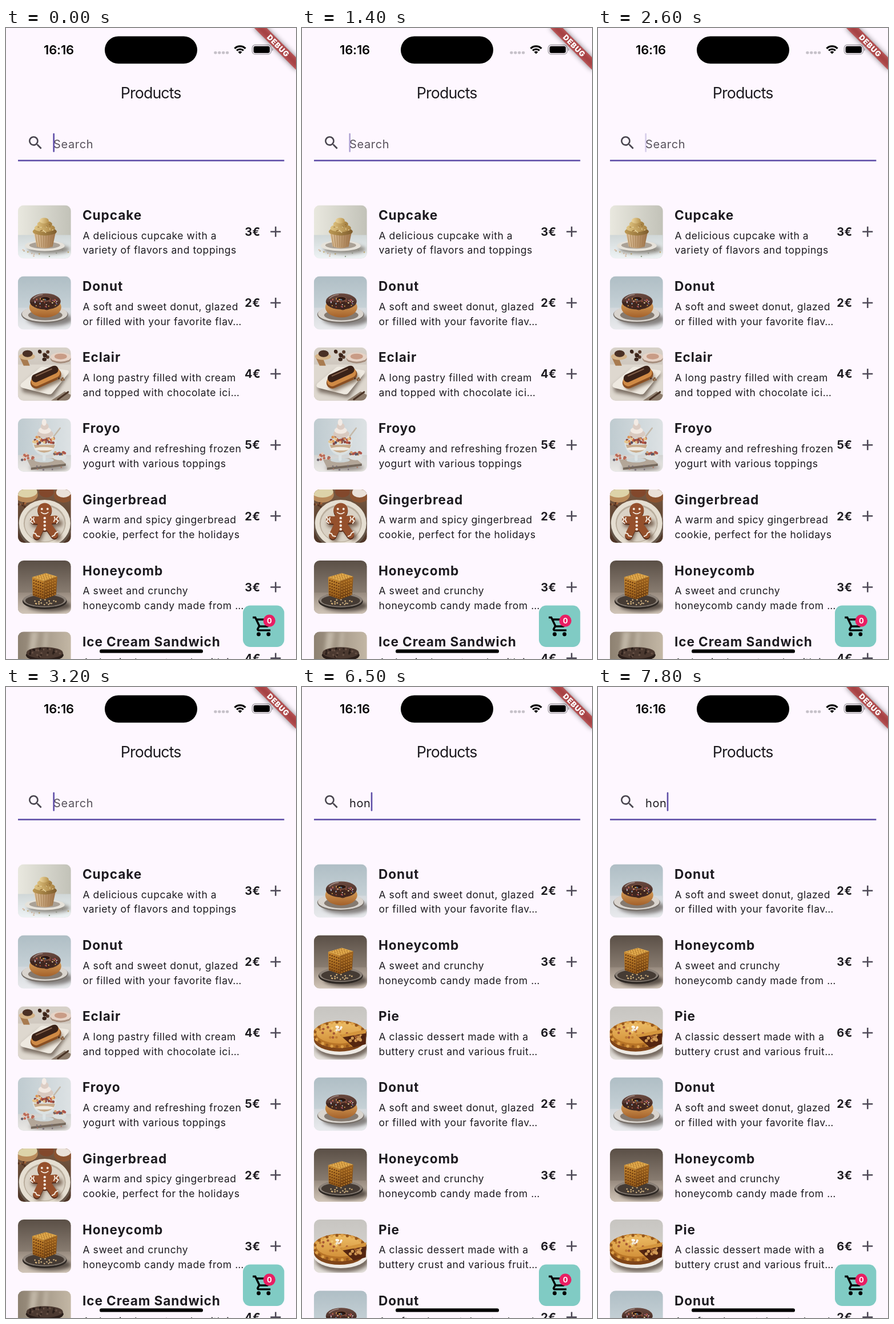
Write an HTML page that moves like this. It is 508 px wide and 1102 px high and loops after 8 s.

```html
<!DOCTYPE html>
<html lang="en">
<head>
<meta charset="utf-8">
<title>Products</title>
<style>
  html, body { margin: 0; width: 100%; height: 100%; overflow: hidden; background: #fef7ff; }
  svg { display: block; width: 100vw; height: 100vh; }
  text { font-family: Inter, Roboto, sans-serif; font-optical-sizing: none; fill: #1d1b20; white-space: pre; }
  .name { font-size: 22.6px; font-weight: 650; letter-spacing: .9px; }
  .desc { font-size: 17.5px; letter-spacing: .55px; }
  .price { font-size: 20px; font-weight: 700; letter-spacing: .5px; text-anchor: middle; }
  .field { font-size: 20px; letter-spacing: .65px; }
  .plus { stroke: #4f4a58; stroke-width: 2.6; }
  .soft { filter: blur(3px); }
</style>
</head>
<body>
<svg viewBox="0 0 508 1102" id="stage">
  <defs id="defs">
    <clipPath id="thumb"><rect width="93" height="93" rx="10.3"/></clipPath>
  </defs>
  <rect width="508" height="1102" fill="#fef7ff"/>

  <text x="92.5" y="46" font-size="22" font-weight="600" letter-spacing="-.2" text-anchor="middle" style="fill:#000">16:16</text>
  <rect x="173" y="14.5" width="162" height="47.7" rx="23.8"/>
  <g fill="#c6c1c9" id="signal"></g>
  <g transform="translate(410 45.3)" fill="none" stroke="#000" stroke-width="3.2">
    <path d="M-9.5-9.5A13.4 13.4 0 0 1 9.5-9.5M-5.9-5.9A8.4 8.4 0 0 1 5.9-5.9"/>
    <path d="M0 0L-3.4-3.4A4.8 4.8 0 0 1 3.4-3.4Z" fill="#000" stroke="none"/>
  </g>
  <rect x="431.3" y="29.5" width="33" height="16.4" rx="5.2" fill="none" stroke="#a19ca3" stroke-width="1.3"/>
  <rect x="433.6" y="31.7" width="28.4" height="12" rx="3.2"/>
  <path d="M466 35v5.4a3 3 0 0 0 0-5.4" fill="#a19ca3"/>

  <text x="253.7" y="122.5" font-size="26.8" letter-spacing="-.9" text-anchor="middle">Products</text>

  <path transform="translate(36.1 185) scale(1.293)" fill="#49454f" d="M15.5 14h-.79l-.28-.27A6.47 6.47 0 0 0 16 9.5 6.5 6.5 0 1 0 9.5 16c1.61 0 3.09-.59 4.23-1.57l.27.28v.79l5 4.99L20.49 19zm-6 0a4.5 4.5 0 1 1 0-9 4.5 4.5 0 0 1 0 9z"/>
  <text class="field" id="hint" x="83" y="209.8" style="fill:#57525b">Search</text>
  <text class="field" id="query" x="83" y="209.8"></text>
  <rect id="caret" y="183.8" width="2.6" height="33" rx="1.2" fill="#5f4fa8"/>
  <rect x="21" y="230.2" width="466.4" height="2.6" fill="#5f4fa8"/>

  <g id="lists"></g>

  <rect x="415" y="1008.6" width="72.4" height="72.4" rx="12.9" fill="#80cbc4"/>
  <path transform="translate(430.5 1024.3) scale(1.724)" d="M15.55 13c.75 0 1.41-.41 1.75-1.03l3.58-6.49A1 1 0 0 0 20.01 4H5.21l-.94-2H1v2h2l3.6 7.59-1.35 2.44C4.52 15.37 5.48 17 7 17h12v-2H7l1.1-2zM6.16 6h12.15l-2.76 5H8.53zM7 18a2 2 0 1 0 0 4 2 2 0 0 0 0-4zm10 0a2 2 0 1 0 0 4 2 2 0 0 0 0-4z"/>
  <circle cx="461.3" cy="1035.2" r="10.6" fill="#e91e63"/>
  <text x="461.3" y="1039.9" font-size="13" font-weight="700" text-anchor="middle" style="fill:#fff">0</text>
  <rect x="164" y="1085.2" width="181" height="6.4" rx="3.2"/>

  <g transform="translate(508 0) rotate(45)">
    <rect x="-52" y="36.2" width="104" height="15.5" fill="#000" opacity=".5" style="filter:blur(5px)"/>
    <rect x="-52" y="36.2" width="104" height="15.5" fill="#b71c1c" fill-opacity=".627"/>
    <text y="48.7" font-size="13" font-weight="900" letter-spacing=".8" text-anchor="middle" style="fill:#fff">DEBUG</text>
  </g>
</svg>

<script>
const $ = id => document.getElementById(id);
const LOOP = 8000;

// Drawing helpers; thumbnails use a 93 x 93 box.
const oval = (x, y, rx, ry, fill) => `<ellipse cx="${x}" cy="${y}" rx="${rx}" ry="${ry}" fill="${fill}"/>`;
const dot = (x, y, r, fill) => oval(x, y, r, r, fill);
const soft = shapes => `<g class="soft">${shapes}</g>`;
const shape = (d, fill) => `<path d="${d}" fill="${fill}"/>`;
const line = (d, stroke, width) =>
  `<path d="${d}" fill="none" stroke="${stroke}" stroke-width="${width}" stroke-linecap="round" stroke-linejoin="round"/>`;
const repeat = (n, draw) => Array.from({ length: n }, (_, i) => draw(i)).join('');
let gradients = 0;
function shade(from, to, sideways) {
  const id = 'shade' + gradients++;
  $('defs').insertAdjacentHTML('beforeend',
    `<linearGradient id="${id}" x2="${sideways ? 1 : 0}" y2="${sideways ? 0 : 1}"><stop stop-color="${from}"/><stop offset="1" stop-color="${to}"/></linearGradient>`);
  return `url(#${id})`;
}
const wall = (from, to, sideways) => shape('M0 0H93V93H0Z', shade(from, to, sideways));
let seed = 7;
const random = () => (seed = seed * 16807 % 2147483647) / 2147483647;
const pick = list => list[Math.floor(random() * list.length)];

// Random dots spread inside an oval.
const scatter = (n, x, y, rx, ry, r, colors) => repeat(n, () => {
  const a = random() * 2 * Math.PI, d = Math.sqrt(random());
  return dot((x + rx * d * Math.cos(a)).toFixed(1), (y + ry * d * Math.sin(a)).toFixed(1), r, pick(colors));
});

const art = {
  cupcake: () => wall('#e9e8df', '#c2c2b8', true) +
    shape('M0 52H93V93H0Z', shade('#d0d7d7', '#eef3f5')) +
    scatter(16, 46, 82, 44, 9, 1.2, ['#c8a85c', '#8fa08a', '#d8b9a0']) +
    soft(oval(54, 77, 37, 8, '#8f8b83')) + oval(47, 71, 35, 9, '#e6e2da') + oval(47, 70, 27, 6, '#aaa196') +
    shape('M28 48H66L61 72Q47 78 33 72Z', shade('#e2c69e', '#9c7148', true)) +
    repeat(8, i => line(`M${31 + i * 4.6} 51L${34.5 + i * 3.6} 73`, '#a37a4c', .8)) +
    oval(47, 46, 21, 7, shade('#bd9a55', '#7f5d2d', true)) + oval(47, 40, 18, 7, shade('#e0c584', '#a98342', true)) +
    oval(47, 33, 13, 6, shade('#dcbf7c', '#a17b3c', true)) + oval(46, 27, 8, 5, shade('#ecd6a0', '#b9954f', true)) +
    scatter(14, 47, 39, 16, 9, .9, ['#f2e2b4', '#906b30']),

  donut: () => wall('#afbec5', '#d6dee2') + shape('M0 55H93V93H0Z', shade('#d3d8dc', '#e9eaed')) +
    soft(oval(56, 75, 40, 12, '#85817f')) + oval(47, 67, 41, 15, '#77706a') + oval(47, 65.5, 40, 14, '#d9d4ce') +
    oval(48, 68, 30, 9, '#857a70') + oval(48, 54, 28, 18, shade('#e9b468', '#a3602a')) +
    oval(48, 44, 27, 14, shade('#6b4a40', '#3b231d')) + shape('M21 45Q24 55 32 52T45 56T60 54T75 45Z', '#40261f') +
    oval(48, 40, 10, 4.5, '#7c5140') + oval(48, 39.5, 8, 3.2, '#2a1712') +
    line('M27 39Q33 33 43 32', '#a08881', 1.6) +
    scatter(34, 48, 46, 24, 8, 1, ['#e6b04f', '#d5769a', '#eee3d4', '#6a8fb5', '#c3563e']),

  eclair: () => wall('#d8d2ca', '#bcb2a7') + shape('M0 30H93V93H0Z', '#ded8cf') +
    shape('M15 17L21 32H10L3 17Z', '#a87b50') + oval(16, 16, 14, 6, '#d5b489') + oval(17, 11, 9, 6, '#4a3024') +
    oval(75, 20, 18, 8, '#a58d7c') + oval(75, 17, 18, 8, '#e6d3c6') + oval(75, 16, 11, 5, '#c99c86') +
    scatter(9, 45, 13, 9, 10, 3, ['#392319', '#57392a']) +
    soft(shape('M6 68L38 41L90 46L61 88L9 78Z', '#7d7166')) +
    shape('M6 63L38 36Q41 33 46 34L87 40Q91 41 88 46L61 79Q58 83 53 82L9 71Q2 69 6 63Z', '#eee9e0') +
    soft(line('M36 68L70 53', '#8b7966', 16)) + line('M32 62L66 47', '#8a4f22', 20) + line('M32 59L65 44', '#cf8a45', 18) +
    line('M31 54L64 39', '#3a2218', 14) + line('M32 50L59 38', '#84614b', 2) +
    shape('M58 93L82 77L93 83V93Z', '#8d7c6c') +
    line('M70 91L88 78', '#4a3325', 3) + scatter(7, 76, 52, 8, 6, 1.6, ['#4a2e20', '#86603f']),

  froyo: () => wall('#bfcbd0', '#dde2e4', true) + shape('M0 64H93V93H0Z', shade('#d2d3d2', '#ebe9e6')) +
    soft(oval(54, 86, 34, 5, '#918a84')) +
    shape('M16 72L72 69L84 79L23 86Z', '#b3a698') + shape('M23 86L84 79V83L23 90Z', '#75685c') +
    line('M61 34L74 17', '#c4b9a9', 2.5) + oval(46, 73, 17, 4, '#ced6d8') + line('M46 59V72', '#dce4e6', 5) +
    shape('M25 38H68Q67 62 46 65Q26 62 25 38Z', '#dce2e2') +
    shape('M28 46H65Q63 58 46 60Q31 58 28 46Z', '#c9ac8c') + oval(46, 53, 17, 3, '#f0ebe2') +
    scatter(40, 46, 38, 21, 8, 2.4, ['#b9543f', '#dc9254', '#5a5060', '#e4c48c', '#8d4a44', '#ecdccb']) +
    oval(48, 27, 14, 7, '#d9c9bf') + oval(47, 21, 11, 6, '#f2e9e2') + oval(47, 14, 7, 6, '#dccdc4') + oval(46, 7, 4, 6, '#f3ebe5') +
    oval(73, 67, 12, 6, '#dce0df') + scatter(15, 73, 62, 10, 4, 2.2, ['#b0564a', '#5d5665', '#d39c6a']) +
    scatter(12, 16, 68, 11, 8, 2.2, ['#bd6a56', '#e3c9b8', '#6a6169']) + scatter(8, 45, 86, 38, 4, 1.3, ['#a97a69', '#7b7079']),

  gingerbread: () => wall('#795b43', '#4d3426') +
    oval(15, 9, 20, 14, '#b98b5b') + oval(15, 4, 19, 10, '#ddd3a9') +
    oval(50, 4, 13, 10, '#82482c') + oval(80, 10, 17, 13, '#8b5330') + oval(80, 5, 13, 9, '#eae1d8') +
    oval(47, 62, 47, 43, '#66574a') + oval(47, 59, 45, 41, '#e5ded1') + oval(47, 59, 37, 33, '#b9ad9c') + oval(47, 60, 35, 31, '#dad2c5') +
    soft(line('M29 60L72 59M43 66L36 85M55 66L70 83', '#7b6554', 12)) +
    ['#552a19', '#95502c'].map((c, i) => `<g transform="translate(0 ${1 - i * 2})">` +
      line('M28 54L45 55L66 53M41 64L33 81M53 64L64 80', c, 13) + oval(47, 57, 13, 16, c) + dot(47, 37, 12.5, c) + '</g>').join('') +
    line('M22 48l3 4l-3 4l4 3M28 49l-1 4l2 4M70 48l-3 4l4 3l-3 4M64 48l1 4l-2 4M27 76l4 1l2 4l5 1M70 74l-4 2l-2 4l-4 2', '#f3e9de', 2) +
    dot(42, 34, 2, '#f3e9de') + dot(52, 34, 2, '#f3e9de') + line('M41 40Q47 45 53 40', '#f3e9de', 1.8) +
    repeat(4, i => dot(47, 50 + i * 6.5, 2.2, '#f6eee6')) + scatter(8, 8, 27, 8, 4, 2, ['#a4653b', '#51301f']),

  honeycomb: () => wall('#5a4f46', '#a79a8d') + shape('M0 56H93V93H0Z', shade('#978a7e', '#d2c6b9')) +
    soft(oval(56, 79, 38, 10, '#5a5048')) + oval(47, 71, 39, 14, '#2f2925') + oval(47, 69, 38, 12.5, '#8b8178') + oval(47, 70, 34, 10, '#453b34') +
    shape('M25 29L49 22L69 28L46 36Z', '#dfa84b') +
    shape('M25 29L46 36V68L26 61Z', shade('#c98a30', '#8f5516')) + shape('M46 36L69 28L67 60L46 68Z', shade('#a3671f', '#6b3c10')) +
    repeat(30, i => dot(28 + i % 5 * 3.9, 34.5 + i % 5 * 1.35 + Math.floor(i / 5) * 5, 1.3, '#6b3a11')) +
    repeat(30, i => dot(49 + i % 5 * 4, 39.5 - i % 5 * 1.4 + Math.floor(i / 5) * 5, 1.1, '#c48632')) +
    repeat(20, i => dot(32 + i % 5 * 4 + Math.floor(i / 5) * 5, 28.5 - i % 5 * 1.2 + Math.floor(i / 5) * 1.7, .9, '#a36a22')) +
    scatter(16, 47, 73, 28, 5, 1.3, ['#d7b47c', '#c9ad80', '#a5743a']),

  sandwich: () => wall('#8d8171', '#c3b7a5', true) + soft(shape('M23 0H36L29 45H18ZM47 0H53L49 45H43Z', '#c0b6a6')) +
    shape('M0 55H93V93H0Z', shade('#b9ad9d', '#ded5c9')) +
    soft(oval(54, 81, 40, 10, '#7d7164')) + oval(46, 72, 43, 14, '#e5ddd2') + oval(46, 71, 34, 9, '#aa9d8e') +
    oval(47, 65, 28, 8, '#33251f') + shape('M20 43H74L72 62Q47 73 22 62Z', shade('#f0e3ca', '#b39d7f', true)) +
    oval(47, 41, 33, 11, '#2a1e19') + oval(47, 37, 32, 10, '#4b3930') +
    scatter(28, 47, 37, 29, 8, 1.8, ['#30231d', '#665044', '#271b17']) +
    scatter(12, 20, 86, 20, 4, 2.2, ['#3b2b22', '#5a4638']),

  marshmallow: () => wall('#cbc5bd', '#dfd9d2', true) + shape('M0 62H93V93H0Z', shade('#d2cbc2', '#ebe5dd')) +
    soft(oval(50, 74, 38, 9, '#a89d91')) + oval(47, 59, 17, 7, '#bdb3a8') + oval(47, 38, 26, 22, '#b5aaa0') +
    scatter(58, 47, 36, 25, 20, 5, ['#f7f3ee', '#e4ddd5', '#b9afa5', '#eee9e3', '#cfc7be']) +
    scatter(20, 42, 27, 18, 11, 4, ['#fbf9f6', '#efeae4']) +
    line('M8 74L30 69M24 82L47 74M55 74L82 83M64 70L86 73', '#a99d90', 8) +
    line('M8 72L30 67M24 80L47 72M55 72L82 81M64 68L86 71', '#f1ebe3', 7),

  pie: () => wall('#c7c5c1', '#dddad6') + shape('M0 43H93V93H0Z', shade('#b4aea7', '#e6e2dd')) +
    soft(oval(50, 72, 46, 20, '#75695f')) + oval(47, 62, 48, 23, '#eeeae4') + oval(45, 58, 45, 21, '#7f4519') +
    oval(45, 49, 47, 24, '#b87427') + oval(45, 46, 41, 19, shade('#edbd66', '#d3913a')) +
    repeat(30, i => dot((45 + 44 * Math.cos(i * .2094)).toFixed(1), (49 + 21.5 * Math.sin(i * .2094)).toFixed(1), 2.6, i % 2 ? '#dda14a' : '#96571c')) +
    scatter(16, 34, 45, 26, 12, 2.2, ['#c07a30', '#a85a35', '#f0c570']) +
    shape('M46 50L92 44L91 66L70 72Z', '#552610') + scatter(18, 73, 56, 16, 6, 2.7, ['#945224', '#d19a55', '#4a2010']) +
    shape('M46 50L92 40L91 47L50 54Z', '#d4953d') + scatter(10, 43, 39, 8, 4, 2, ['#fbf7ed', '#eee4d2'])
};

const products = {
  cupcake: ['Cupcake', 3, 'A delicious cupcake with a', 'variety of flavors and toppings'],
  donut: ['Donut', 2, 'A soft and sweet donut, glazed', 'or filled with your favorite flav…'],
  eclair: ['Eclair', 4, 'A long pastry filled with cream', 'and topped with chocolate ici…'],
  froyo: ['Froyo', 5, 'A creamy and refreshing frozen', 'yogurt with various toppings'],
  gingerbread: ['Gingerbread', 2, 'A warm and spicy gingerbread', 'cookie, perfect for the holidays'],
  honeycomb: ['Honeycomb', 3, 'A sweet and crunchy', 'honeycomb candy made from …'],
  sandwich: ['Ice Cream Sandwich', 4, 'A classic dessert made with ice', 'cream sandwiched between t…'],
  marshmallow: ['Marshmallow', 2, 'A soft and fluffy marshmallow,', 'perfect for roasting or adding …'],
  pie: ['Pie', 6, 'A classic dessert made with a', 'buttery crust and various fruit…']
};

for (const key in art)
  $('defs').insertAdjacentHTML('beforeend', `<g id="${key}" clip-path="url(#thumb)">${art[key]()}</g>`);

function row(key, i) {
  const [name, price, first, second] = products[key];
  return `<g transform="translate(0 ${(309.4 + i * 124.13).toFixed(2)})">
    <use href="#${key}" x="20.8"/>
    <text class="name" x="134" y="25.6">${name}</text>
    <text class="desc" x="134.5" y="59.4">${first}</text>
    <text class="desc" x="134.5" y="85.1">${second}</text>
    <text class="price" x="432" y="53.7">${price}€</text>
    <path class="plus" d="M463.3 46.4h18m-9-9v18"/>
  </g>`;
}

// Each stage of the search: start time, typed text, caret position, visible products.
const stages = [
  { at: 0, query: '', caret: 82.4, hint: 1, keys: Object.keys(products) },
  { at: 3300, query: 'h', caret: 94.8, hint: .92, keys: ['honeycomb', 'sandwich', 'marshmallow', 'pie'] },
  { at: 6500, query: 'hon', caret: 120.7, hint: 0, keys: ['donut', 'honeycomb', 'pie'] }
];
$('lists').innerHTML = stages.map(({ keys }) =>
  `<g>${repeat(7, i => row(keys[i % keys.length], i))}</g>`).join('');
$('signal').innerHTML = repeat(4, i =>
  `<rect x="${364.3 + i * 6.9}" y="40.8" width="5.2" height="4.8" rx="1.8"/>`);

// Caret opacity steps: [time, opacity].
const blink = [
  [0, 1], [400, .25], [500, 0], [700, .5], [800, 1],
  [1400, .5], [1500, 0], [1700, .5], [1800, 1],
  [2400, .75], [2500, 0], [2600, .25], [3200, 1],
  [7400, .5], [7500, 0], [7700, .5], [7800, 1]
];

function render() {
  const t = performance.now() % LOOP;
  const now = stages.findLast(s => s.at <= t);
  stages.forEach((s, i) => $('lists').children[i].style.display = s === now ? '' : 'none');
  $('query').textContent = now.query;
  $('hint').style.opacity = now.hint;
  $('caret').setAttribute('x', now.caret);
  $('caret').style.opacity = blink.findLast(b => b[0] <= t)[1];
  requestAnimationFrame(render);
}
render();
</script>
</body>
</html>
```
